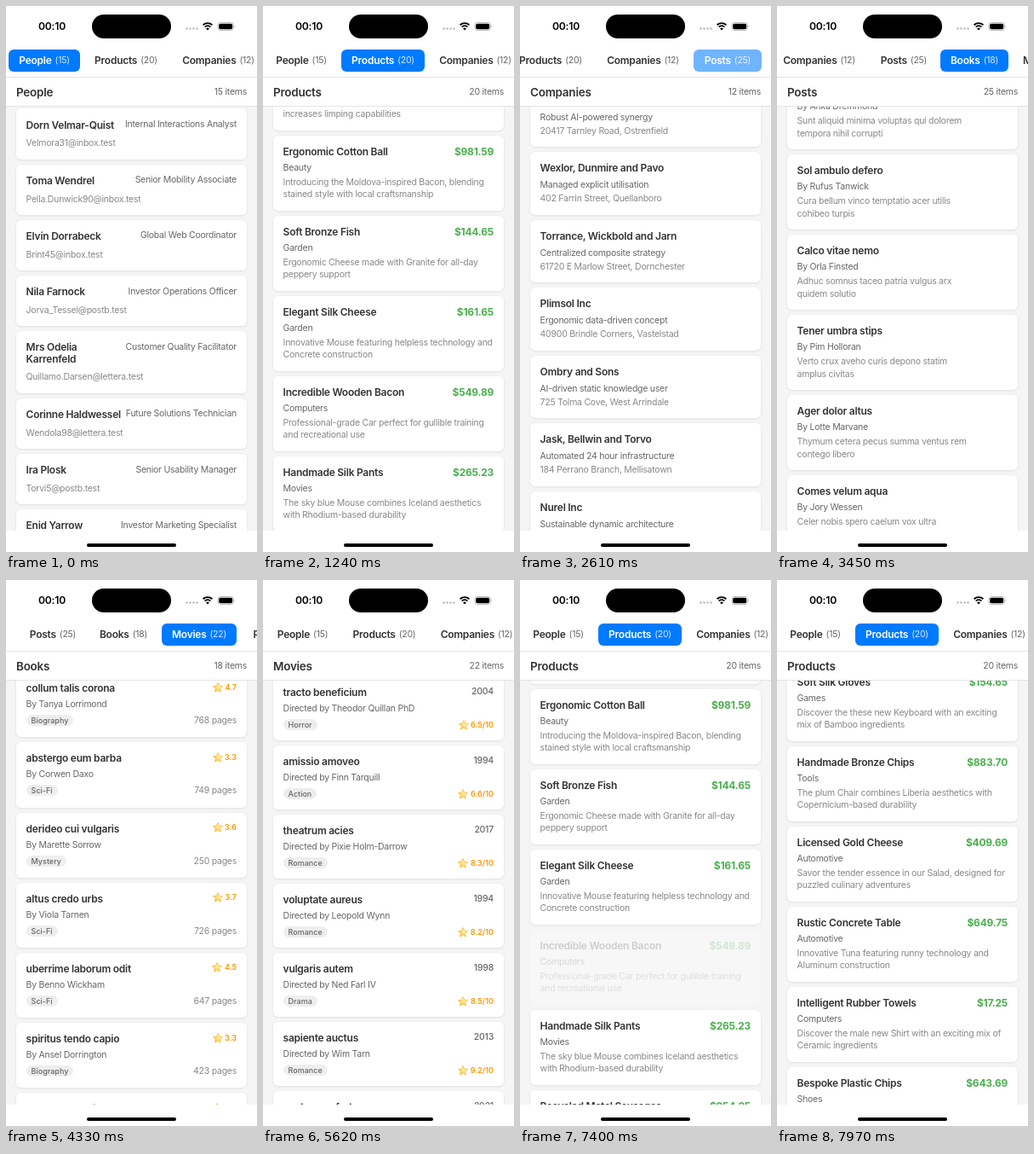
Write an HTML page that moves like this. It is 295 by 640 pixels and loops after 8000 ms.

```html
<!DOCTYPE html>
<html lang="en">
<head>
<meta charset="utf-8">
<title>Tabbed lists</title>
<style>
html, body { margin: 0; width: 100%; height: 100%; overflow: hidden; background: #fff; }
#stage { position: relative; width: 295px; height: 640px; overflow: hidden; background: #fff;
  font: 10.5px/14px Inter, Roboto, sans-serif; letter-spacing: -.024em; color: #666; white-space: pre; }
#stage div, #stage svg.icon { position: absolute; }
.clock { left: 38px; top: 17px; font-size: 12.2px; font-weight: 600; color: #000; letter-spacing: -.02em; }
.island { left: 100.7px; top: 10.4px; width: 93.4px; height: 27.7px; border-radius: 14px; background: #000; }
.home { left: 95.3px; top: 630.2px; width: 104.4px; height: 3.8px; border-radius: 2px; background: #000; }
.bar { top: 46px; left: 0; width: 295px; height: 37px; overflow: hidden; border-bottom: 1px solid #e4e4e4; }
.tab { top: 5.2px; height: 25.8px; border-radius: 6px; display: flex; align-items: center; justify-content: center; gap: 4px; }
.tab b { font-size: 12px; font-weight: 600; color: #333; }
.tab.on { background: #007aff; }
.tab.on b { color: #fff; }
.tab.on span { color: #d6e9ff; }
.heading { left: 0; top: 84px; width: 295px; height: 33px; border-bottom: 1px solid #e4e4e4; }
.heading b { position: absolute; left: 12px; top: 9px; font-size: 13.5px; line-height: 16px; font-weight: 600; color: #333; }
.heading span { position: absolute; right: 12px; top: 10px; }
.view { left: 0; top: 118px; width: 295px; height: 497px; overflow: hidden; background: #f5f5f5; }
.list { left: 0; top: 0; width: 295px; }
.card { left: 11.8px; width: 271.2px; border-radius: 6px; background: #fff; box-shadow: 0 .8px 3px rgba(0,0,0,.1); }
.card > div { left: 11.8px; }
.card > .right { left: auto; right: 12px; }
.title { font-size: 12px; font-weight: 600; color: #333; }
.pale { color: #888; line-height: 14.8px; }
.price { font-size: 12px; font-weight: 700; color: #4caf50; }
.year { font-weight: 500; }
.tag { padding: 0 6px; border-radius: 7px; background: #eee; font-size: 9px; font-weight: 500; line-height: 13px; letter-spacing: 0; }
.rating { display: flex; align-items: center; gap: 2.5px; font-size: 9px; font-weight: 600; color: #ff9500; letter-spacing: 0; }
</style>
</head>
<body>
<div id="stage">
  <div class="clock">00:10</div>
  <div class="island"></div>
  <svg class="icon" style="left:208px;top:16px" width="64" height="16">
    <linearGradient id="gold" x1="1" y1="0" x2="0" y2="1"><stop offset=".3" stop-color="#fff2b8"/><stop offset="1" stop-color="#ffc02a"/></linearGradient>
    <g fill="#b8b8b8"><circle cx="4.5" cy="10.5" r="1.2"/><circle cx="8.5" cy="10.5" r="1.2"/><circle cx="12.5" cy="10.5" r="1.2"/><circle cx="16.5" cy="10.5" r="1.2"/></g>
    <g fill="none" stroke="#000" stroke-width="1.9"><path d="M23.6 6.2a8 8 0 0 1 10.8 0M25.7 8.6a4.8 4.8 0 0 1 6.6 0"/></g>
    <path d="M29 12.4l-1.9-2a2.8 2.8 0 0 1 3.8 0z"/>
    <rect x="41" y="3.5" width="18.5" height="9" rx="2.8" fill="none" stroke="#aaa" stroke-width=".8"/>
    <rect x="42.2" y="4.7" width="16" height="6.6" rx="1.8"/>
    <path d="M60.6 6.5q1.6 1.5 0 3z" fill="#aaa"/>
  </svg>
  <div class="bar"><div id="tabs"></div></div>
  <div class="heading"><b id="name"></b><span id="count"></span></div>
  <div class="view" id="view"></div>
  <div class="home"></div>
</div>
<script>
const LOOP = 8000;
const FIRST_TOP = 2.4;

// name, item count, left edge, width
const TABS = [
  ['People', 15, 3, 84], ['Products', 20, 92, 98], ['Companies', 12, 196, 107],
  ['Posts', 25, 309, 80], ['Books', 18, 392, 80], ['Movies', 22, 477, 88], ['Recipes', 16, 570, 95]
];

// Fields are split by "|", lines by "~".
const DATA = [
`Dorn Velmar-Quist|Internal Interactions Analyst|Velmora31@inbox.test
Toma Wendrel|Senior Mobility Associate|Pella.Dunwick90@inbox.test
Elvin Dorrabeck|Global Web Coordinator|Brint45@inbox.test
Nila Farnock|Investor Operations Officer|Jorva_Tessel@postb.test
Mrs Odelia~Karrenfeld|Customer Quality Facilitator|Quillamo.Darsen@lettera.test
Corinne Haldwessel|Future Solutions Technician|Wendola98@lettera.test
Ira Plosk|Senior Usability Manager|Torvi5@postb.test
Enid Yarrow|Investor Marketing Specialist|Enid.Y22@inbox.test`,
`Modern Linen Chair|$318.20|Sports|A new lightweight frame that gently~increases limping capabilities
Ergonomic Cotton Ball|$981.59|Beauty|Introducing the Moldova-inspired Bacon, blending~stained style with local craftsmanship
Soft Bronze Fish|$144.65|Garden|Ergonomic Cheese made with Granite for all-day~peppery support
Elegant Silk Cheese|$161.65|Garden|Innovative Mouse featuring helpless technology and~Concrete construction
Incredible Wooden Bacon|$549.89|Computers|Professional-grade Car perfect for gullible training~and recreational use
Handmade Silk Pants|$265.23|Movies|The sky blue Mouse combines Iceland aesthetics~with Rhodium-based durability
Recycled Metal Sausages|$954.25|Music|Savor the smoky essence in our Pizza, designed for~hearty culinary adventures
Soft Silk Gloves|$154.65|Games|Discover the these new Keyboard with an exciting~mix of Bamboo ingredients
Handmade Bronze Chips|$883.70|Tools|The plum Chair combines Liberia aesthetics with~Copernicium-based durability
Licensed Gold Cheese|$409.69|Automotive|Savor the tender essence in our Salad, designed for~puzzled culinary adventures
Rustic Concrete Table|$649.75|Automotive|Innovative Tuna featuring runny technology and~Aluminum construction
Intelligent Rubber Towels|$17.25|Computers|Discover the male new Shirt with an exciting mix of~Ceramic ingredients
Bespoke Plastic Chips|$643.69|Shoes|Soft Gloves designed with Steel for quiet~performance`,
`Orvell Group|Seamless modular forecast|4106 Plumbrook Row, Tessingham
Drannock LLC|Robust AI-powered synergy|20417 Tarnley Road, Ostrenfield
Wexlor, Dunmire and Pavo|Managed explicit utilisation|402 Farrin Street, Quellanboro
Torrance, Wickbold and Jarn|Centralized composite strategy|61720 E Marlow Street, Dornchester
Plimsol Inc|Ergonomic data-driven concept|40900 Brindle Corners, Vastelstad
Ombry and Sons|AI-driven static knowledge user|725 Tolma Cove, West Arrindale
Jask, Bellwin and Torvo|Automated 24 hour infrastructure|184 Perrano Branch, Mellisatown
Nurel Inc|Sustainable dynamic architecture|57 Hollin Way, Port Sarrow
Kevra and Sons|Open-source neutral portal|88 Willet Lane, East Dunmoor`,
`Vespera tenax cum|By Anka Dremmond|Sunt aliquid minima voluptas qui dolorem~tempora nihil corrupti
Sol ambulo defero|By Rufus Tanwick|Cura bellum vinco temptatio acer utilis~cohibeo turpis
Calco vitae nemo|By Orla Finsted|Adhuc somnus taceo patria vulgus arx~quidem solutio
Tener umbra stips|By Pim Holloran|Verto crux aveho curis depono statim~amplus civitas
Ager dolor altus|By Lotte Marvane|Thymum cetera pecus summa ventus rem~contego libero
Comes velum aqua|By Jory Wessen|Celer nobis spero caelum vox ultra~demo iste
Unde porro tutis|By Tilda Crane|Denique sordeo video carus tondeo vel~basium ordo`,
`vinum lenis arcus|3.9|By Petra Onslow|Mystery|512 pages
nemus clarus ordo|4.1|By Hugo Stennal|Fantasy|388 pages
collum talis corona|4.7|By Tanya Lorrimond|Biography|768 pages
abstergo eum barba|3.3|By Corwen Daxo|Sci-Fi|749 pages
derideo cui vulgaris|3.6|By Marette Sorrow|Mystery|250 pages
altus credo urbs|3.7|By Viola Tarnen|Sci-Fi|726 pages
uberrime laborum odit|4.5|By Benno Wickham|Sci-Fi|647 pages
spiritus tendo capio|3.3|By Ansel Dorrington|Biography|423 pages
ventus amor sidus|4.2|By Greta Pennow|Fantasy|301 pages`,
`candidus fluo|1987|Directed by Mara Tollen|Drama|7.4
sidus levis|2009|Directed by Otis Brandow|Action|6.9
umbra velox|2016|Directed by Liese Harrant|Comedy|8.1
tracto beneficium|2004|Directed by Theodor Quillan PhD|Horror|6.5
amissio amoveo|1994|Directed by Finn Tarquill|Action|6.6
theatrum acies|2017|Directed by Pixie Holm-Darrow|Romance|8.3
voluptate aureus|1994|Directed by Leopold Wynn|Romance|8.2
vulgaris autem|1998|Directed by Ned Farl IV|Drama|8.5
sapiente auctus|2013|Directed by Wim Tarn|Romance|9.2
ventus confortus|2021|Directed by Ola Merrin|Action|7.7`
];

// Card height, gap, and the class and middle line of each field.
const LAYOUTS = [
  [59.3, 5.9, ['title', 19.3], ['right', 18.7], ['pale', 41]],
  [88, 6, ['title', 19], ['price right', 19], ['', 38], ['pale', 54.5]],
  [73.5, 6, ['title', 19], ['', 39], ['pale', 55]],
  [88, 6, ['title', 19], ['', 38], ['pale', 54.5]],
  [76.15, 6, ['title', 19], ['rating right', 17.5], ['', 38], ['tag', 57], ['pale right', 57]],
  [75, 6, ['title', 19], ['year right', 18], ['', 38], ['tag', 57], ['rating right', 57]]
];

const STAR = '<svg width="12" height="12" viewBox="0 0 24 24"><path fill="url(#gold)" stroke="#f5b021" stroke-width="1.4" d="M12 1l3.3 7.2 7.7.9-5.7 5.3 1.6 7.6L12 18l-6.9 4 1.6-7.6L1 9.1l7.7-.9z"/></svg>';

// Moments at which the picture is refreshed: from, to, steps.
const REFRESH = [
  [0, 0, 1], [800, 1240, 5], [1650, 2080, 5], [2230, 2380, 2], [2610, 2610, 1], [2710, 2940, 3],
  [3220, 3220, 1], [3450, 3680, 3], [3820, 3820, 1], [4000, 4550, 6], [4700, 5420, 8],
  [5520, 5520, 1], [5620, 5860, 3], [6420, 6980, 6], [7400, 7970, 6]
].flatMap(([from, to, n]) => Array.from({ length: n }, (_, i) => from + (to - from) * i / Math.max(1, n - 1)));

const ACTIVE = [[0, 0], [800, 1], [1650, 2], [2610, 3], [3450, 4], [4220, 5], [6420, 1]];
const PAGE = [[0, 0], [900, 1], [1750, 2], [2700, 3], [3560, 4], [4430, 5], [6530, 1]];
const PRESS = [[800, 1], [1650, 2], [2610, 3], [3220, 4], [4220, 5], [6420, 1]];
const BAR = [[0, 0], [1650, 0], [2080, 105], [2610, 105], [2940, 200], [3450, 200], [3680, 294],
  [4330, 294], [4700, 375], [5100, 375], [5520, -6], [5620, -1.5], [5860, 0]];
const SCROLL = [
  [[0, 0]],
  [[910, 0], [1240, 62.4], [6980, 62.4], [7400, 86.4], [7970, 677.4]],
  [[1750, 0], [2380, 108]],
  [[2710, 0], [2940, 40]],
  [[3680, 0], [4220, 176.4]],
  [[4550, 0], [5620, 250.4]]
];

const $ = id => document.getElementById(id);

function add(parent, cls, css = {}) {
  const el = parent.appendChild(document.createElement('div'));
  el.className = cls;
  Object.assign(el.style, css);
  return el;
}

function fillField(el, cls, text, page) {
  if (cls.startsWith('rating')) el.innerHTML = `${STAR}<span>${text}${page === 5 ? '/10' : ''}</span>`;
  else el.textContent = text.replaceAll('~', '\n');
}

function buildList(rows, page) {
  const [height, gap, ...fields] = LAYOUTS[page];
  const list = add($('view'), 'list');
  let top = FIRST_TOP;
  for (const row of rows.split('\n')) {
    const values = row.split('|');
    const extra = values[0].includes('~') ? 13.3 : 0;
    const card = add(list, 'card', { top: `${top}px`, height: `${height + extra}px` });
    fields.forEach(([cls, middle], i) => {
      const shift = cls === 'pale' ? extra : 0;
      fillField(add(card, cls, { top: `${middle - 7 + shift}px` }), cls, values[i], page);
    });
    top += height + extra + gap;
  }
  return list;
}

const tabs = TABS.map(([name, count, x, w]) => {
  const el = add($('tabs'), 'tab', { left: `${x}px`, width: `${w}px` });
  el.innerHTML = `<b>${name}</b><span>(${count})</span>`;
  return el;
});
const lists = DATA.map(buildList);
const pressedCard = lists[1].children[4];

const latest = (keys, t) => keys.findLast(([at]) => at <= t)[1];

function glide(keys, t) {
  const next = keys.findIndex(([at]) => at > t);
  if (next < 0) return keys.at(-1)[1];
  if (next === 0) return keys[0][1];
  const [t0, a] = keys[next - 1], [t1, b] = keys[next];
  const left = 1 - (t - t0) / (t1 - t0);
  return b - (b - a) * left * left;
}

function render(now) {
  const t = REFRESH.findLast(at => at <= now % LOOP);
  const active = latest(ACTIVE, t), page = latest(PAGE, t);
  const pressed = PRESS.find(([at]) => Math.abs(at - t) < 1);
  tabs.forEach((el, i) => {
    el.classList.toggle('on', i === active);
    el.style.opacity = pressed && pressed[1] === i ? .56 : 1;
  });
  $('tabs').style.left = `${-glide(BAR, t)}px`;
  $('name').textContent = TABS[page][0];
  $('count').textContent = `${TABS[page][1]} items`;
  lists.forEach((el, i) => {
    el.style.display = i === page ? 'block' : 'none';
    el.style.top = `${-glide(SCROLL[i], t)}px`;
  });
  pressedCard.style.opacity = t < 7400 ? 1 : Math.min(1, .2 + (t - 7400) / 250);
}

function tick() {
  render(performance.now());
  requestAnimationFrame(tick);
}
tick();
</script>
</body>
</html>
```
